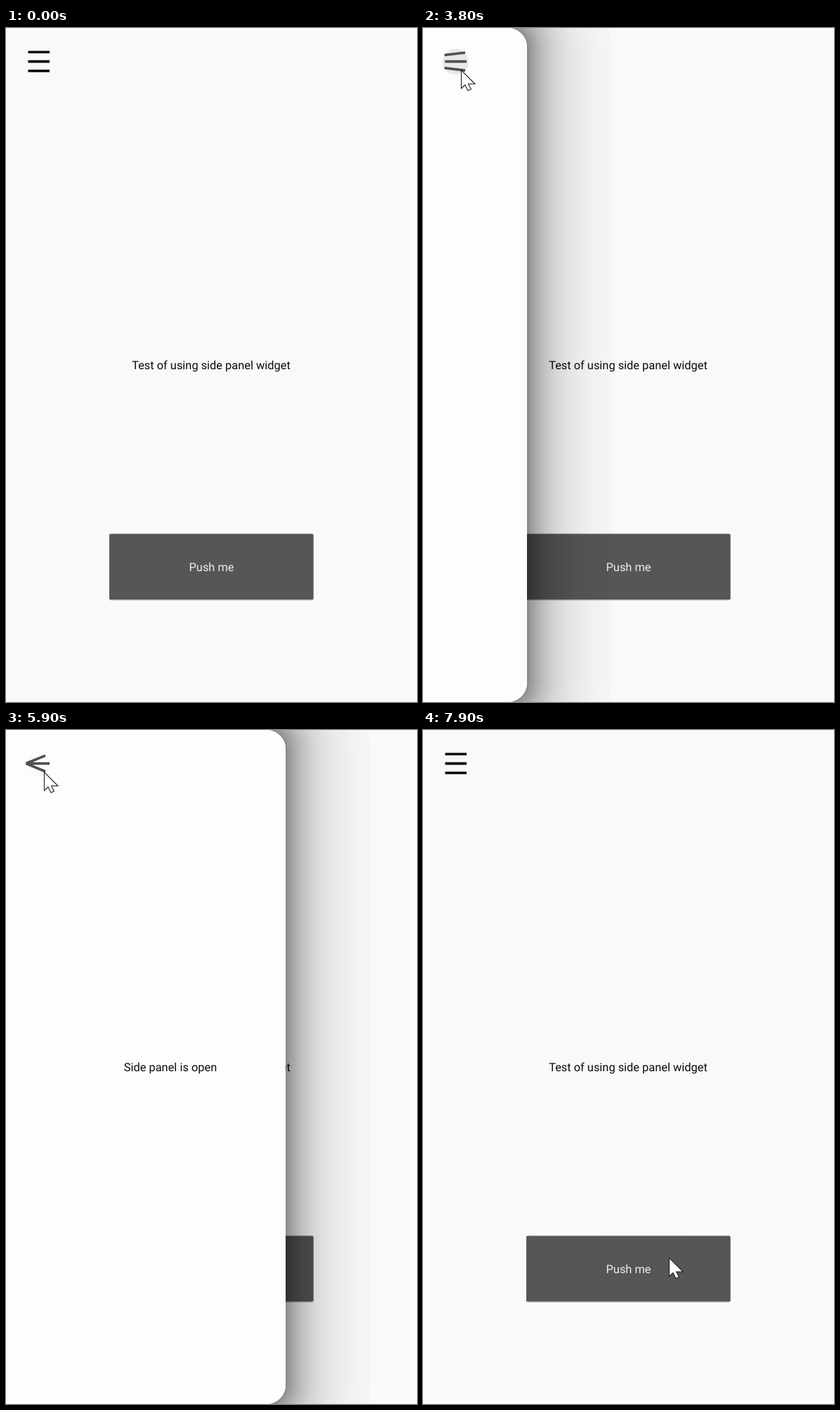
Animation of 585x958 px, one loop 8 s. Source, as an HTML page:

```html
<!DOCTYPE html>
<html lang="en">
<head>
<meta charset="utf-8">
<title>Side panel</title>
<style>
  html, body { margin: 0; width: 100%; height: 100%; overflow: hidden; background: #f9f9f9; }
  svg { display: block; width: 100%; height: 100%; }
  text { font: 16.4px Roboto, Arial, sans-serif; text-anchor: middle; text-rendering: geometricPrecision; fill: #0c0c0c; }
</style>
</head>
<body>
<svg viewBox="0 0 585 958">
  <rect width="585" height="958" fill="#f9f9f9"/>
  <text x="292" y="485">Test of using side panel widget</text>
  <rect x="147" y="718.5" width="290.6" height="95" rx="2.5" fill="#b0b0ae"/>
  <rect x="147" y="719.3" width="290.6" height="93" rx="2" fill="#565654"/>
  <text x="292.5" y="772" style="fill:#ededed">Push me</text>

  <g id="panel">
    <g id="shadow" fill="none" stroke="#000" stroke-width="3"/>
    <rect x="-560" width="560" height="958" rx="27" fill="#fdfdfb"/>
  </g>
  <text id="label" y="485">Side panel is open</text>

  <circle id="ripple" cx="46.5" cy="48" r="18.5" fill="#e7e8e7"/>
  <path id="icon" fill="none" stroke-width="3.6"/>
  <path id="cursor" d="M0 0V26L5.5 21L9.5 29L14 27L10 19.5H19.5Z" fill="#fff" stroke="#222" stroke-width="1.1"/>
</svg>
<script>
const LOOP = 8000, STEP = 100, WIDTH = 468;
const CLOSE = 5800, CLOSED = 6400;
const el = id => document.getElementById(id);
const panel = el("panel"), shadow = el("shadow"), label = el("label");
const ripple = el("ripple"), icon = el("icon"), cursor = el("cursor");

const clamp = (v, lo, hi) => Math.min(hi, Math.max(lo, v));
const mix = (a, b, p) => a + (b - a) * p;
const pulse = (t, from, to) => t > from && t < to ? Math.sin(Math.PI * (t - from) / (to - from)) : 0;
const show = (node, on) => { node.style.display = on ? "" : "none"; };

// the shadow is a set of rounded rings that fade with distance
for (let d = 0; d < 120; d += 3) {
  const ring = document.createElementNS("http://www.w3.org/2000/svg", "rect");
  const grow = d + 1.5;
  const shape = {
    x: -560 - grow, y: -grow, width: 560 + 2 * grow, height: 958 + 2 * grow,
    rx: 27 + grow, "stroke-opacity": 0.45 * Math.exp(-grow / 36)
  };
  for (const key in shape) ring.setAttribute(key, shape[key]);
  shadow.append(ring);
}

// right edge of the panel, at a steady speed each way
function edgeAt(t) {
  if (t >= CLOSED) return 0;
  return t < CLOSE ? clamp((t - 3615) * 0.8, 0, WIDTH) : WIDTH - (t - CLOSE) * 0.703;
}

// pointer moves: start, end, from x, y, to x, y, sideways bulge
const moves = [
  [500, 600, 319, 6, 317.5, 11, 0],
  [1600, 1700, 317.5, 25, 301.5, 268.5, 0],
  [2400, 2500, 138.5, 225, 138.5, 225, 0],
  [2800, 3400, 238, 161.5, 54.5, 60, 0],
  [6700, 7400, 54.5, 60, 363, 707, 150],
  [7800, 7900, 355, 733, 350.5, 750.5, 0]
];

function pointerAt(t) {
  const move = moves.findLast(m => m[0] <= t);
  if (!move || (t >= 2500 && t < 2800)) return null;
  const [start, end, x0, y0, x1, y1, bulge] = move;
  const u = clamp((t - start) / (end - start), 0, 1);
  const p = bulge ? u * u * (3 - 2 * u) : 1 - (1 - u) ** 1.85;
  return [mix(x0, x1, p) + bulge * Math.sin(Math.PI * p), mix(y0, y1, p)];
}

const bar = (a, b, p) => {
  const [x1, y1, x2, y2] = a.map((v, i) => mix(v, b[i], p).toFixed(2));
  return `M${x1} ${y1}L${x2} ${y2}`;
};

function draw(time) {
  const t = Math.floor(time / STEP) * STEP;
  const closing = t > CLOSE;

  const edge = Math.round(edgeAt(t));
  show(panel, edge > 0);
  panel.setAttribute("transform", `translate(${edge})`);

  // label and icon trail the panel by one step while it closes
  const inner = edgeAt(closing ? t - STEP : t);
  const x = inner - WIDTH / 2;
  show(label, edge > 0 && !(closing && x < 66));
  label.setAttribute("x", x);

  const p = edge > 0 ? inner / WIDTH : 0;
  const glow = pulse(t, 3550, 4200) + 0.3 * pulse(t, 5850, CLOSED);
  ripple.setAttribute("opacity", glow);
  icon.setAttribute("stroke", glow ? "#505050" : "#050505");
  icon.setAttribute("d",
    bar([31.5, 34.3, 62, 34.3], [28.5, 47.5, 56, 36.3], p) +
    bar([31.5, 47.6, 62, 47.6], [30.5, 47.6, 62, 47.6], p) +
    bar([31.5, 61, 62, 61], [28.5, 47.7, 56, 59], p));

  const spot = pointerAt(t);
  show(cursor, spot);
  if (spot) cursor.setAttribute("transform", `translate(${spot[0]} ${spot[1]})`);
}

function tick() {
  draw(performance.now() % LOOP);
  requestAnimationFrame(tick);
}
tick();
</script>
</body>
</html>
```
